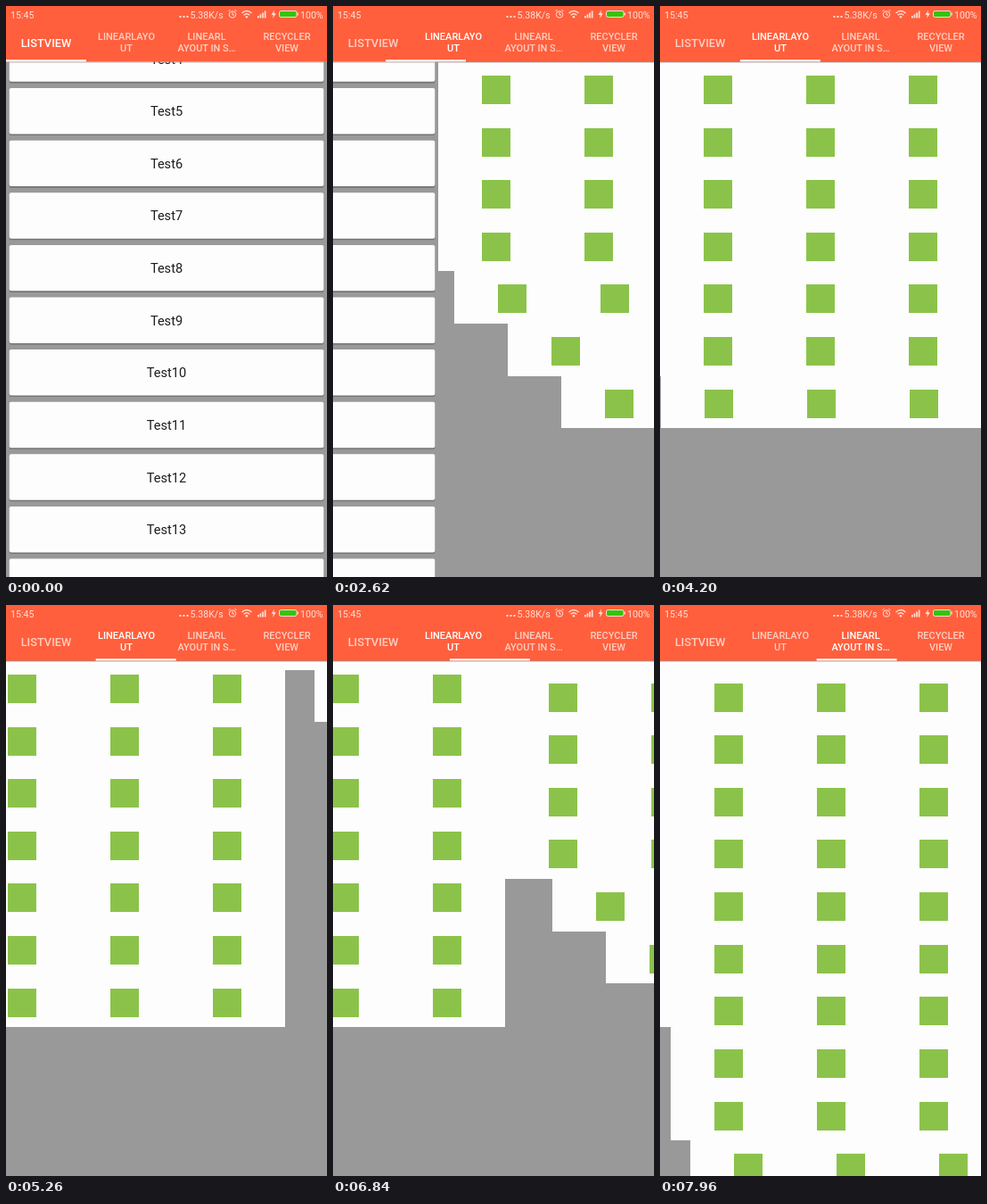
Recreate the animation shown at these times as an HTML page. Size 360 by 640 pixels, loop 8 s.

```html
<!DOCTYPE html>
<html>
<head>
<meta charset="utf-8">
<style>
html, body { margin: 0; width: 100%; height: 100%; overflow: hidden; }
svg { display: block; font-family: Roboto, sans-serif; }
.card { font-size: 14.6px; fill: #1c1c1c; text-anchor: middle; }
.tab { font-weight: 500; fill: #ffcfc5; text-anchor: middle; }
.tab.on { fill: #fff; }
.status { font-size: 10.6px; fill: #ffe0d8; }
</style>
</head>
<body>
<svg id="stage" width="360" height="640" viewBox="0 0 360 640">
  <rect width="360" height="640" fill="#999"/>
  <g id="pages"></g>
  <rect y="62" width="360" height="2" fill="#999" opacity=".35"/>
  <rect width="360" height="62.5" fill="#ff5f3c"/>
  <g class="status">
    <text x="5" y="13.5">15:45</text>
    <path d="M194.5 11h2v2h-2zm4 0h2v2h-2zm4 0h2v2h-2z"/>
    <text x="206.5" y="13.5">5.38K/s</text>
    <text x="330" y="13.5">100%</text>
    <g fill="none" stroke="#ffe0d8">
      <circle cx="254" cy="9.5" r="3.7"/>
      <path d="M254 7v3h2M249.5 6l2-2M258.5 6l-2-2"/>
      <path d="M264.5 8q5.5-5 11 0M266.7 10.2q3.3-3 6.6 0" stroke-width="1.4"/>
    </g>
    <circle cx="270" cy="12.2" r="1.3"/>
    <path d="M282 11h1.7v2.5h-1.7zm2.6-1.7h1.7v4.2h-1.7zm2.6-1.8h1.7v6h-1.7zm2.6-2h1.7v8h-1.7z"/>
    <path d="M301 4.5l-3.5 5.5h2.4l-.7 4 3.6-5.7h-2.4z"/>
    <rect x="306.5" y="5.5" width="19.5" height="7" rx="2" fill="#35c40c" stroke="#ffe0d8"/>
    <path d="M326.5 7.5h1.3v3h-1.3z"/>
  </g>
  <g id="tabs"></g>
  <rect id="bar" y="60.2" width="90" height="2.2" fill="#fff"/>
</svg>
<script>
const W = 360, TOP = 63, ROW = 58.62, STEP = 60, LOOP = 8;
const $ = id => document.getElementById(id);

function add(parent, tag, attrs, text = '') {
  const el = document.createElementNS('http://www.w3.org/2000/svg', tag);
  for (const k in attrs) el.setAttribute(k, attrs[k]);
  el.textContent = text;
  return parent.appendChild(el);
}
// Whole pixels keep neighbouring rows and pages free of seams
const shift = (el, x) => el.setAttribute('transform', `translate(${Math.round(x)} 0)`);

// Tabs: one or two lines of label each
const tabs = [['LISTVIEW'], ['LINEARLAYO', 'UT'], ['LINEARL', 'AYOUT IN S…'], ['RECYCLER', 'VIEW']]
  .map((lines, i) => {
    const tab = add($('tabs'), 'g', { class: 'tab' });
    const two = lines.length > 1;
    lines.forEach((line, k) => add(tab, 'text', {
      x: 45 + 90 * i, y: two ? 38.3 + 12.9 * k : 45.6, 'font-size': two ? 11 : 12.83
    }, line));
    return tab;
  });

const pages = [0, 1, 2].map(() => add($('pages'), 'g', {}));

for (let k = 0; k < 11; k++) {
  const y = 33.4 + ROW * k;
  const card = { x: 3.7, width: 352.6, height: 51.4, rx: 2 };
  add(pages[0], 'rect', { ...card, y: y + 1.6, fill: '#747474' });
  add(pages[0], 'rect', { ...card, y, fill: '#fdfdfd' });
  add(pages[0], 'text', { class: 'card', x: 180, y: y + 31.2 }, 'Test' + (k + 4));
}

function addRow(page, top, height, icons) {
  const row = add(page, 'g', {}), y = Math.round(top);
  add(row, 'rect', { y, width: W, height: Math.round(top + height) - y, fill: '#fdfdfd' });
  for (let c = 0; c < icons; c++)
    add(row, 'rect', { x: 49 + 115 * c, y: y + 15, width: 32, height: 32, fill: '#8bc34a' });
  return row;
}
const rows = [[], [], []], SPACER = 9.6;
for (let i = 0; i < 7; i++) rows[1].push(addRow(pages[1], TOP + ROW * i, ROW, 3));
rows[2].push(addRow(pages[2], TOP, SPACER, 0));
for (let i = 0; i < 10; i++) rows[2].push(addRow(pages[2], TOP + SPACER + ROW * i, ROW, 3));

// Finger drag: time (s), page position, speed (pages/s)
const drag = [
  [.42, 0, .15], [1.68, .278, .3], [2.62, .672, .42], [3.64, .989, .04], [4.2, .9987, .004],
  [4.6, 1, 0], [6.14, 1.375, .1], [6.98, 1.506, .35], [7.4, 1.703, .5], [7.96, 1.967, .4]
];
function position(t) {
  if (t <= drag[0][0]) return 0;
  const i = drag.findIndex(d => d[0] > t);
  if (i < 0) return drag[drag.length - 1][1];
  const [t0, p0, v0] = drag[i - 1], [t1, p1, v1] = drag[i];
  const h = t1 - t0, u = (t - t0) / h, w = 1 - u;
  return w * w * ((1 + 2 * u) * p0 + u * h * v0) + u * u * ((3 - 2 * u) * p1 - w * h * v1);
}

function draw(now) {
  const t = now / 1000 % LOOP, p = position(t);
  pages.forEach((page, n) => {
    shift(page, W * (n - p));
    // Rows catch up one after another as their page comes in
    const shown = Math.max(0, p - n + 1);
    rows[n].forEach((row, i) =>
      shift(row, Math.max(0, STEP * (i + 1 - rows[n].length * shown))));
  });
  tabs.forEach((tab, i) => tab.classList.toggle('on', i === Math.round(p)));
  $('bar').setAttribute('x', 90 * position(t - .04));
  requestAnimationFrame(draw);
}
draw(performance.now());
</script>
</body>
</html>
```
